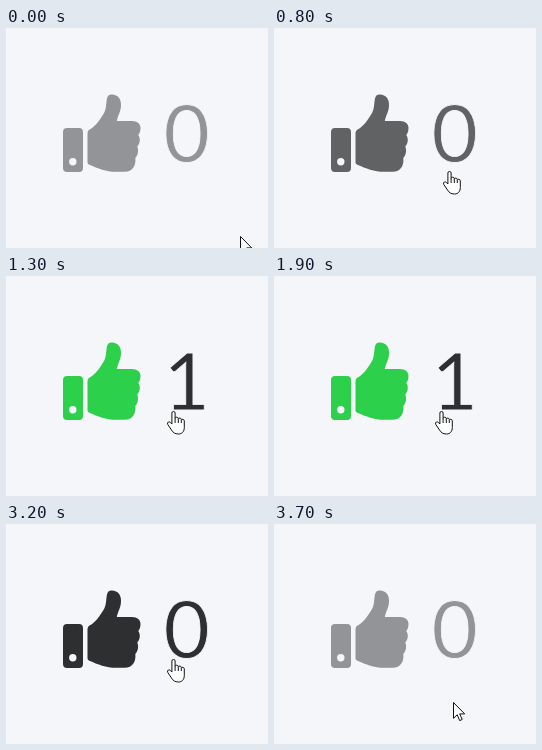
An HTML page that plays this animation: 262x220 px, repeating every 3.8 s.

```html
<!DOCTYPE html>
<html lang="en">
<head>
<meta charset="utf-8">
<title>Like button</title>
<style>
  html, body { margin: 0; width: 100%; height: 100%; overflow: hidden; background: #f4f6f9; }
  svg { display: block; width: 262px; height: 220px; }
  /* The background-coloured stroke thins the digits slightly. */
  text { font: 80px Lato, sans-serif; stroke: #f4f6f9; stroke-width: .8; }
  .cursor { fill: #fff; stroke: #111; stroke-width: 1; stroke-linejoin: round; }
</style>
</head>
<body>
<svg viewBox="0 0 262 220">
  <g id="thumb">
    <path fill-rule="evenodd" d="M61 100H73Q77 100 77 104V140Q77 144 73 144H61Q57 144 57 140V104Q57 100 61 100Z
      M66.8 130a3.7 3.7 0 1 0 0 7.4a3.7 3.7 0 1 0 0-7.4Z"/>
    <path d="M81.5 105Q81.5 102.8 83.5 101.5C90 98.5 95 90 98.3 84.5C100.3 80.5 100 76 100.8 71.5
      C101.4 67.8 103 66.5 106 66.5C112 66.7 115 71 115 77C115 84 111.5 88 110.8 93
      H126C131.5 93 134.5 96 134.5 100C134.5 103.5 133.5 105.5 132.3 107
      C134.8 111 134 115.5 131.3 118.5C133 123 131.7 127.5 129.3 130
      C130.2 137 127 143.8 118.5 143.8H110C100 143.8 92 140.3 83.3 136.7Q81.5 136 81.5 134.3Z"/>
  </g>
  <text id="count" x="157.4" y="134.3">0</text>
  <path id="arrow" class="cursor" d="M.5 .5V16.3L4.2 12.8L6.7 18.6L9.2 17.5L6.7 11.9H11.7Z"/>
  <path id="hand" class="cursor" d="M-.1 13V2Q-.1 .5 1.5 .5T3.1 2V7.5Q3.2 6.2 4.7 6.2T6.3 7.6V8.3
    Q6.5 7.1 7.8 7.1T9.3 8.6V9.3Q9.6 8.2 10.8 8.3T12.3 9.8V16.5C12.3 20.5 10 23 6.5 23
    C3 23 1 21.5-.5 19L-4.2 13.5Q-5 11.7-3.7 11Q-2.5 10.5-1.3 11.7ZM3.1 7.5V12M6.3 8.3V12M9.3 9.3V12"/>
</svg>
<script>
const LOOP = 3800, STEP = 100;
const GREY = [147, 148, 151], DARK = [46, 47, 49], GREEN = "rgb(45 208 75)";
const [thumb, count, arrow, hand] =
  ["thumb", "count", "arrow", "hand"].map(id => document.getElementById(id));

// Pointer keys: time, x, y
const entering = [[600, 232, 204], [700, 196, 167], [800, 174, 143], [900, 166, 135]];
const leaving = [[3400, 167, 139], [3500, 171, 152], [3600, 176, 168], [3700, 179, 178]];
const path = [[0, 234, 208], ...entering, [3300, 166, 135], ...leaving];

const progress = (t, from, to) => Math.min(1, Math.max(0, (t - from) / (to - from)));
const mix = (a, b, k) => `rgb(${a.map((v, i) => Math.round(v + (b[i] - v) * k))})`;

function pointerAt(t) {
  const next = path.findIndex(key => key[0] > t);
  if (next < 0) return path.at(-1).slice(1);
  const [a, b] = [path[next - 1], path[next]];
  const k = progress(t, a[0], b[0]);
  return [a[1] + (b[1] - a[1]) * k, a[2] + (b[2] - a[2]) * k];
}

function draw(now) {
  const t = Math.floor(now % LOOP / STEP) * STEP;
  const liked = t >= 1300 && t < 3200;
  const hovering = t >= 800 && t < 3500;
  const hover = progress(t, 700, 900) - progress(t, 3500, 3700);
  const ink = mix(GREY, DARK, hover);

  thumb.setAttribute("fill", liked ? GREEN : ink);
  count.setAttribute("fill", ink);
  count.textContent = liked ? 1 : 0;

  const onStage = t < 100 || t >= 600;
  const [x, y] = pointerAt(t);
  for (const [shape, shown] of [[arrow, !hovering], [hand, hovering]]) {
    shape.setAttribute("visibility", onStage && shown ? "visible" : "hidden");
    shape.setAttribute("transform", `translate(${x} ${y})`);
  }
}

const start = performance.now();
function tick() {
  draw(performance.now() - start);
  requestAnimationFrame(tick);
}
tick();
</script>
</body>
</html>
```
